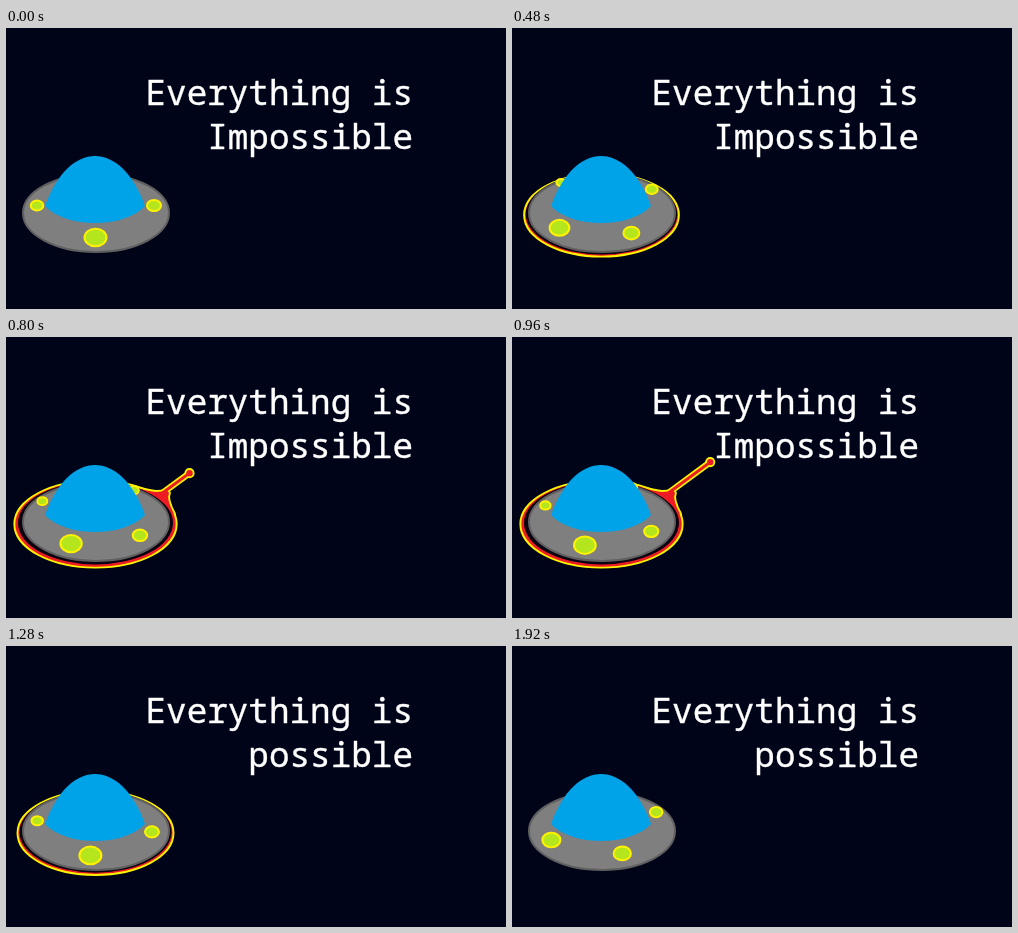
Write an HTML page that moves like this. It is 500 by 281 pixels and loops after 2000 ms.

```html
<!DOCTYPE html>
<html lang="en">
<head>
<meta charset="utf-8">
<title>Everything is possible</title>
<style>
  html, body { margin: 0; width: 100%; height: 100%; overflow: hidden; background: #000418; }
  svg { display: block; width: 100vw; height: 100vh; }
  text {
    font: 34.3px "Noto Sans Mono", "DejaVu Sans Mono", monospace;
    fill: #fff; stroke: #fff; stroke-width: 0.4; text-anchor: end;
  }
  .glow { fill: #fff200; stroke: #fff200; stroke-width: 3.8; }
  .core { fill: #ed1c24; stroke: #ed1c24; stroke-width: 0; }
  .glow .arm { stroke-width: 6.4; }
  .core .arm { stroke-width: 3; }
  .lamps { fill: #b5e61d; stroke: #fff200; stroke-width: 2; }
</style>
</head>
<body>
<svg viewBox="0 0 500 281">
  <text x="407" y="77">Everything is</text>
  <text id="prefix" x="242.4" y="121">Im</text>
  <text x="407" y="121">possible</text>
  <g id="field">
    <g class="glow"></g>
    <g class="core"></g>
    <ellipse id="gap" cx="89.5" cy="186" fill="#0a0210"/>
  </g>
  <ellipse cx="90" cy="185" rx="73" ry="39" fill="#7f7f7f" stroke="#606060" stroke-width="2"/>
  <g class="lamps"></g>
  <path d="M39 178C63 111.3 115 111.3 139 178C118 200.7 60 200.7 39 178Z" fill="#00a2e8"/>
</svg>
<script>
const STEP = 80, LOOP = 2000, TURN = 20;
const DIR = { x: 0.8, y: -0.6 }, REACH = 60;
const $ = s => document.querySelector(s);
const clamp = v => Math.min(1, Math.max(0, v));

function set(el, attrs) {
  for (const k in attrs) el.setAttribute(k, attrs[k]);
}
function add(parent, tag, attrs = {}) {
  const el = document.createElementNS("http://www.w3.org/2000/svg", tag);
  set(el, attrs);
  return parent.appendChild(el);
}

// Lamp sizes at the back, left, front and right of the hull
const sizes = [3.5, 6.3, 11, 7];
const lamps = sizes.map(() => add($(".lamps"), "ellipse"));

const layers = [".glow", ".core"].map(s => {
  const body = add($(s), "ellipse", { cx: 89.5, cy: 187 });
  const limb = add($(s), "g");
  add(limb, "path", {
    d: "M108 145Q136 153 150 155Q156 155 161 153L163 156Q160 162 168 177L130 185Z",
    "stroke-linejoin": "round"
  });
  return {
    body, limb,
    arm: add(limb, "path", { class: "arm" }),
    knob: add(limb, "circle", { r: 3.2 })
  };
});

// Each lamp makes a quarter turn, those at the back and left easing out most
function drawLamp(el, i, p) {
  const base = (i - 1) * Math.PI / 2;
  const bend = 0.55 + 0.5 * Math.cos(base + Math.PI / 4);
  const angle = base + (p + bend * p * (1 - p)) * Math.PI / 2;
  const growth = 1 - (1 - p) ** (Math.sin(angle) > 0 ? 4 : 1);
  const r = sizes[i] + (sizes[(i + 1) % 4] - sizes[i]) * growth;
  set(el, { cx: 89.5 - 58.5 * Math.cos(angle), cy: 177.5 + 32 * Math.sin(angle), rx: r, ry: r * 0.8 });
}

function drawField(n) {
  const k = clamp(Math.min((n - 4) / 4, (18.8 - n) / 4.8));
  const bulge = clamp(Math.min((n - 5) / 3, (16 - n) / 2));
  const reach = Math.max(0, Math.min(9.2 * (n - 6.4), REACH / 2 * (15 - n)));
  const x = 157 + DIR.x * reach, y = 156 + DIR.y * reach;

  $("#field").style.display = k > 0 ? "" : "none";
  for (const { body, limb, arm, knob } of layers) {
    set(body, { rx: 72.7 + 7.5 * k, ry: 38.7 + 4 * k });
    set(limb, { transform: `translate(135 168) scale(${bulge}) translate(-135 -168)` });
    limb.style.display = bulge > 0 ? "" : "none";
    set(arm, { d: `M155 157L${x} ${y}` });
    set(knob, { cx: x, cy: y });
  }
  set($("#gap"), { rx: 74 + 3.5 * k, ry: 39.5 + 2 * k });

  // The arm drags the prefix behind the hull
  const pull = n > 13 ? 1.6 * (reach - REACH) : 0;
  set($("#prefix"), { transform: `translate(${DIR.x * pull} ${DIR.y * pull})` });
  $("#prefix").style.display = n < 16 ? "" : "none";
}

const begin = performance.now();
function tick() {
  const n = Math.floor((performance.now() - begin) % LOOP / STEP);
  lamps.forEach((el, i) => drawLamp(el, i, n % TURN / TURN));
  drawField(n);
  requestAnimationFrame(tick);
}
tick();
</script>
</body>
</html>
```
